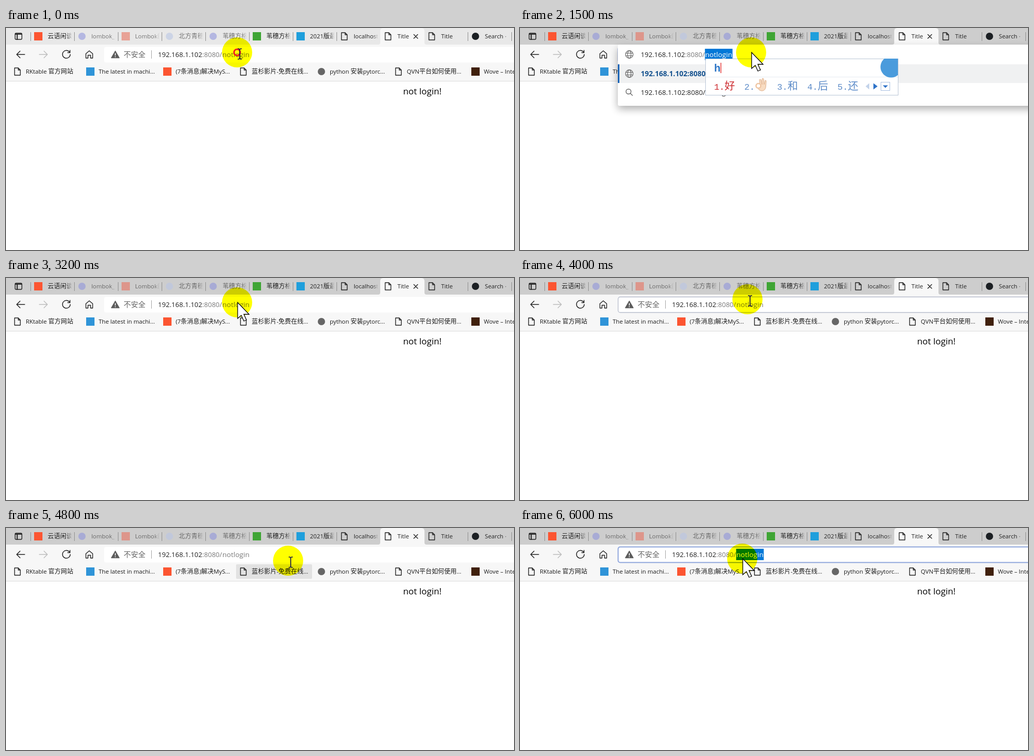
These frames come from a looping animation (976 px wide and 428 px high, 8000 ms). An HTML page:

```html
<!DOCTYPE html>
<html lang="zh-CN">
<head>
<meta charset="utf-8">
<title>Browser login redirect</title>
<style>
html, body { margin: 0; width: 100%; height: 100%; overflow: hidden; background: #fff; }
svg { display: block; font-family: "Open Sans", "Noto Sans CJK SC", "Noto Sans CJK", sans-serif; }
text { white-space: pre; }
.line { fill: none; stroke: #222; stroke-width: 1.4; stroke-linecap: round; stroke-linejoin: round; }
.mono { font-family: "Liberation Mono", monospace; font-size: 16.67px; }
.han { font-family: "Noto Sans CJK SC", "Noto Sans CJK", sans-serif; font-size: 20px; font-weight: 300; }
.typed { font: bold 20px "Liberation Sans", sans-serif; fill: #2b74c5; }
#halo { mix-blend-mode: multiply; }
</style>
</head>
<body>
<svg id="stage" width="976" height="428" viewBox="0 0 976 428">
  <defs>
    <linearGradient id="fadeOut"><stop offset=".78" stop-color="#fff"/><stop offset="1" stop-color="#000"/></linearGradient>
    <mask id="fade" maskUnits="userSpaceOnUse" x="0" y="0" width="47" height="32">
      <rect width="47" height="32" fill="url(#fadeOut)"/>
    </mask>
    <filter id="soft" x="-10%" y="-30%" width="120%" height="160%"><feGaussianBlur stdDeviation="8"/></filter>
    <clipPath id="panelClip"><rect id="panelClipBox" x="356" y="59" width="371" height="70"/></clipPath>
    <path id="file" class="line" d="M-5.500 -7H1.500L5.500 -3V7H-5.500ZM1.500 -7V-3H5.500"/>
  </defs>

  <rect width="976" height="428" fill="#fff"/>
  <rect id="strip" width="976" height="32" fill="#cdcdcd"/>
  <rect y="32" width="976" height="70" fill="#f7f7f7"/>
  <rect y="102" width="976" height="1" fill="#dcdcdc"/>
  <g id="tabs"></g>
  <g id="nav" class="line">
    <rect x="17.500" y="10" width="13" height="12" rx="2"/>
    <path d="M18 11.800H30M21.500 12V22" stroke-width="2"/>
    <path d="M36 51H20.500M27 44.500L20.500 51L27 57.500"/>
    <path d="M64 51H79.500M73 44.500L79.500 51L73 57.500" stroke="#bdbdbd"/>
    <path id="reload" d="M122.500 47A7.500 7.500 0 1 0 123.500 51M123 43V47.500H118.500"/>
    <path id="stop" d="M110.500 45.500L121.500 56.500M121.500 45.500L110.500 56.500"/>
    <path d="M153.500 49.500L160 44L166.500 49.500V58H162.500V52.500H157.500V58H153.500Z"/>
  </g>
  <rect id="hover" x="442" y="70" width="146" height="28" rx="2" fill="#e2e2e2"/>
  <g id="bookmarks"></g>
  <g id="page"></g>

  <rect id="bar" x="188.500" y="36.500" width="810" height="30" rx="4" fill="#fff"/>
  <g id="address"></g>

  <g id="list">
    <rect x="188" y="40" width="820" height="116" rx="3" fill="#000" opacity=".32" filter="url(#soft)"/>
    <rect x="188" y="32" width="820" height="118" rx="3" fill="#fff"/>
    <rect x="188" y="70" width="800" height="36" fill="#f0f1f2"/>
    <rect x="188" y="70" width="3" height="36" fill="#1a64b7"/>
    <g class="line" style="stroke:#666" stroke-width="1.200">
      <circle cx="208.500" cy="122.500" r="4.800"/><path d="M212 126L216 130"/>
    </g>
    <g id="listText"></g>
  </g>

  <g id="ime"></g>
  <circle id="halo" r="29" fill="#ff0"/>
  <circle id="click" r="6" fill="none" stroke="#f02020" stroke-width="3"/>
  <path id="arrow" d="M0 0V31L7 25L12 36L17 34L12 23H22Z" fill="#fff" stroke="#000" stroke-width="1.300"/>
  <path id="beam" d="M-4 -10H-1.500L0 -8.500L1.500 -10H4M0 -8.500V8.500M-4 10H-1.500L0 8.500L1.500 10H4" fill="none" stroke="#1a1a4a" stroke-width="1.700"/>
</svg>
<script>
const LOOP = 8000, STEP = 100;
const $ = id => document.getElementById(id);
const show = (id, on) => { $(id).style.display = on ? '' : 'none'; };

// Han runs are set a little larger than the Latin around them.
function label(x, y, text, size, attrs = '') {
  const runs = text.split(/([\u3000-\u9fff]+)/).map((run, i) =>
    i % 2 ? `<tspan font-size="${size * 1.06}">${run}</tspan>` : run);
  return `<text x="${x}" y="${y}" font-size="${size}" ${attrs}>${runs.join('')}</text>`;
}
const file = (x, y) => `<use href="#file" x="${x}" y="${y}"/>`;
const square = (x, y, color) => `<rect x="${x - 8}" y="${y - 8}" width="16" height="16" fill="${color}"/>`;
const dot = (x, y, color, r = 7) => `<circle cx="${x}" cy="${y}" r="${r}" fill="${color}"/>`;
const icon = (x, y, [shape, color]) => shape(x, y, color);

const RED = [square, '#fc5531'], PAGE = [file];
const TABS = [
  ['云语闲谈', RED], ['lombok_', [dot, '#8f94dc'], 1], ['Lombok的', [square, '#e9705c'], 1],
  ['北方青穗', [dot, '#b9c6e6'], 1], ['苇穗方格', [dot, '#8f94dc'], 1], ['苇穗方格', [square, '#3fa535']],
  ['2021版最新', [square, '#1f9fdc']], ['localhost', PAGE], ['Title', PAGE], ['Title', PAGE],
  ['Search ·', [dot, '#1b1f23']]
];
const BOOKMARKS = [
  [22, 'RKtable 官方网站', PAGE], [162, 'The latest in machi...', [square, '#2f94d8']],
  [310, '(7条消息)解决MyS...', RED], [456, '蓝杉影片-免费在线...', PAGE],
  [606, 'python 安装pytorc...', [dot, '#666']], [754, 'QVN平台如何使用...', PAGE],
  [902, 'Wove – Interactive', [square, '#40200c']]
];

$('tabs').innerHTML = '<path d="M715 32q4 0 4-4V6q0-6 6-6H798q6 0 6 6V28q0 4 4 4Z" fill="#f7f7f7"/>' +
  TABS.map(([title, mark, asleep], i) => {
    const x = 47 + 84 * i, active = i === 8, line = active || i === 9 ? '' : `<path d="M${x + .5} 8V25" stroke="#8f8f8f"/>`;
    return `${line}<g opacity="${asleep ? .58 : 1}">${icon(x + 15, 16, mark)}
      <g transform="translate(${x + 33} 0)" mask="url(#fade)">${label(0, 20, title, 11.3, 'fill="#222"')}</g></g>`;
  }).join('') +
  '<path class="line" d="M783.500 12.500L791 20M791 12.500L783.500 20"/><path d="M971.500 8V25" stroke="#8f8f8f"/>';

$('bookmarks').innerHTML = BOOKMARKS.map(([x, title, mark]) =>
  icon(x, 84, mark) + label(x + 16, 88, title, 11.3, 'fill="#1c1c1c"')).join('');
$('page').innerHTML = label(763, 128, 'not login!', 16.9);

const globe = y => `<g class="line" style="stroke:#666;stroke-width:1.200">
  <circle cx="210" cy="${y}" r="7.300"/><ellipse cx="210" cy="${y}" rx="3.300" ry="7.300"/>
  <path d="M203.500 ${y - 2.5}H216.500M203.500 ${y + 2.5}H216.500"/></g>`;

function addressText(x, { path, selected, editing }) {
  const end = x + 123.300;
  return (selected ? `<rect x="${end}" y="40" width="53" height="22" fill="#0078d7"/>` : '') +
    label(x, 56, '192.168.1.102<tspan fill="#7a7a7a">:8080/</tspan>', 13.05, 'fill="#222"') +
    label(end + .5, 56, path, 13.5, `fill="${selected ? '#fff' : editing ? '#222' : '#7a7a7a'}"`) +
    (editing && !selected ? `<path d="M${end + 38.5} 42V60" stroke="#222"/>` : '');
}

function drawAddress(state) {
  const warning = `<path d="M210 44.500L217.500 57.500H202.500Z" fill="#5c5c5c" stroke="#5c5c5c" stroke-width="1.500" stroke-linejoin="round"/>
    <path d="M210 48.500V53M210 54.500V56.200" stroke="#fff" stroke-width="1.500"/>` +
    label(226, 56, '不安全', 13.2, 'fill="#666"') + '<path d="M279.500 43V59" stroke="#a5a5a5"/>';
  $('address').innerHTML = state.list ? '' : warning + addressText(292, state);
  $('listText').innerHTML = globe(51) + addressText(232, { ...state, editing: true }) + globe(88) +
    label(232, 93, '192.168.1.102:8080/' + state.path, 13.65, 'font-weight="700" fill="#15528f"') +
    label(232, 129, '192.168.1.102:8080/' + state.path, 13.15, 'fill="#222"');
}

const HAND = '\u2020';
const CANDIDATES = {
  h: ['好', HAND, '和', '后', '还'],
  ho: ['后', '红', '候', '哄', '吼'],
  hom: ['hom', '后', '红', '候', '哄'],
  home: ['home', '后', '红', '候', '哄']
};
const handAt = x => `<g transform="translate(${x} 97)" fill="#f8dcc2" stroke="#dfb08c">
  <path d="M9 13L8 3Q9 0 11 3L13 12L13 1Q15 -1 16 1L17 12L19 4Q21 3 21 6L20 18Q18 25 11 24Q6 23 5 18Z"/>
  <circle cx="6" cy="14.500" r="4.500" fill="#fff" stroke="#efc5a2" stroke-width="2.500"/></g>`;

function drawIme(typed) {
  if (!typed) { $('ime').innerHTML = ''; return; }
  let x = 373;
  const words = CANDIDATES[typed].map((word, i) => {
    const color = i ? '#5c8bc8' : '#cc2a2e', at = x + 20, latin = /[a-z]/.test(word);
    const body = word === HAND ? handAt(x + 21)
      : `<text x="${at}" y="119" class="${latin ? 'mono' : 'han'}">${word}</text>`;
    x = at + (latin ? word.length * 10 : word === HAND ? 25 : 20) + 18;
    return `<g fill="${color}"><text x="${at - 20}" y="119" class="mono">${i + 1}.</text>${body}</g>`;
  }).join('');
  const end = x - 18, right = end + 76;
  $('panelClipBox').setAttribute('width', right - 356);
  $('ime').innerHTML = `<rect x="356.500" y="59.500" width="${right - 356}" height="70" fill="#fff" stroke="#b9c6d6"/>
    <path d="M357 94.500H${right}" stroke="#e6ebf1"/>
    <circle cx="${right - 13}" cy="75" r="20.500" fill="#4a9bdc" clip-path="url(#panelClip)"/>
    <text id="typed" class="typed" x="373" y="84">${typed}</text>${words}
    <path d="M${end + 21} 106.500V118.500L${end + 14} 112.500Z" fill="#c3d3ea"/>
    <path d="M${end + 29} 106.500V118.500L${end + 37} 112.500Z" fill="#2f73c8"/>
    <rect x="${end + 43.5}" y="104.500" width="17" height="16" fill="#fff" stroke="#a9c0e2"/>
    <path d="M${end + 47} 110.500H${end + 57}L${end + 52} 115.500Z" fill="#2f73c8"/>`;
  const caret = 374 + Math.round($('typed').getComputedTextLength());
  $('ime').insertAdjacentHTML('beforeend', `<path d="M${caret} 67V87" stroke="#e02020" stroke-width="1.300"/>`);
}

// Each row changes only the properties it names.
const STATES = [
  [0, { strip: '#e8e8e8', border: 'none', path: 'notlogin', selected: false, editing: false, list: false,
        typed: '', loading: false, hover: false, click: true, arrow: false }],
  [100, { strip: '#cdcdcd', border: '#8fa6dc', selected: true }],
  [200, { click: false, arrow: true }],
  [1500, { list: true, typed: 'h' }],
  [1700, { typed: 'ho' }],
  [1800, { typed: 'hom' }],
  [2000, { typed: 'home' }],
  [2300, { typed: '', path: 'home', selected: false }],
  [2900, { list: false, path: 'notlogin', border: 'none', loading: true }],
  [3100, { loading: false }],
  [4000, { arrow: false, border: '#b6bccb' }],
  [4400, { arrow: true, border: 'none', hover: true }],
  [4800, { arrow: false }],
  [4900, { hover: false, border: '#b6bccb' }],
  [5500, { border: '#8fa6dc', click: true }],
  [5700, { click: false, arrow: true }],
  [5800, { selected: true }]
];
const PATH = [
  [0, 444, 47], [3900, 444, 47], [4000, 437, 41], [4100, 436, 31], [4300, 470, 52], [4500, 540, 96],
  [4600, 552, 98], [4800, 542, 63], [4900, 532, 56], [5200, 450, 46], [5500, 427, 59], [LOOP, 427, 59]
];

function pointerAt(t) {
  const i = PATH.findIndex(p => p[0] > t);
  const [t0, x0, y0] = PATH[i - 1], [t1, x1, y1] = PATH[i];
  const k = (t - t0) / (t1 - t0);
  return [x0 + (x1 - x0) * k, y0 + (y1 - y0) * k];
}
const move = (id, x, y) => $(id).setAttribute('transform', `translate(${x} ${y})`);

function render(t) {
  const state = Object.assign({}, ...STATES.filter(row => row[0] <= t).map(row => row[1]));
  const [x, y] = pointerAt(t);
  $('strip').setAttribute('fill', state.strip);
  $('bar').setAttribute('stroke', state.border);
  $('bar').setAttribute('stroke-width', state.border === '#8fa6dc' ? 2 : 1.3);
  for (const id of ['list', 'hover', 'click', 'arrow']) show(id, state[id]);
  show('beam', !state.arrow);
  show('reload', !state.loading);
  show('stop', state.loading);
  drawAddress(state);
  drawIme(state.typed);
  move('halo', x, y);
  move('click', x, y);
  move('arrow', x + 1, y);
  move('beam', x + 5, y + 3);
}

let start, shown = -1;
function tick(now) {
  start ??= now;
  const t = Math.floor((now - start) % LOOP / STEP) * STEP;
  if (t !== shown) render(shown = t);
  requestAnimationFrame(tick);
}
render(0);
requestAnimationFrame(tick);
</script>
</body>
</html>
```
